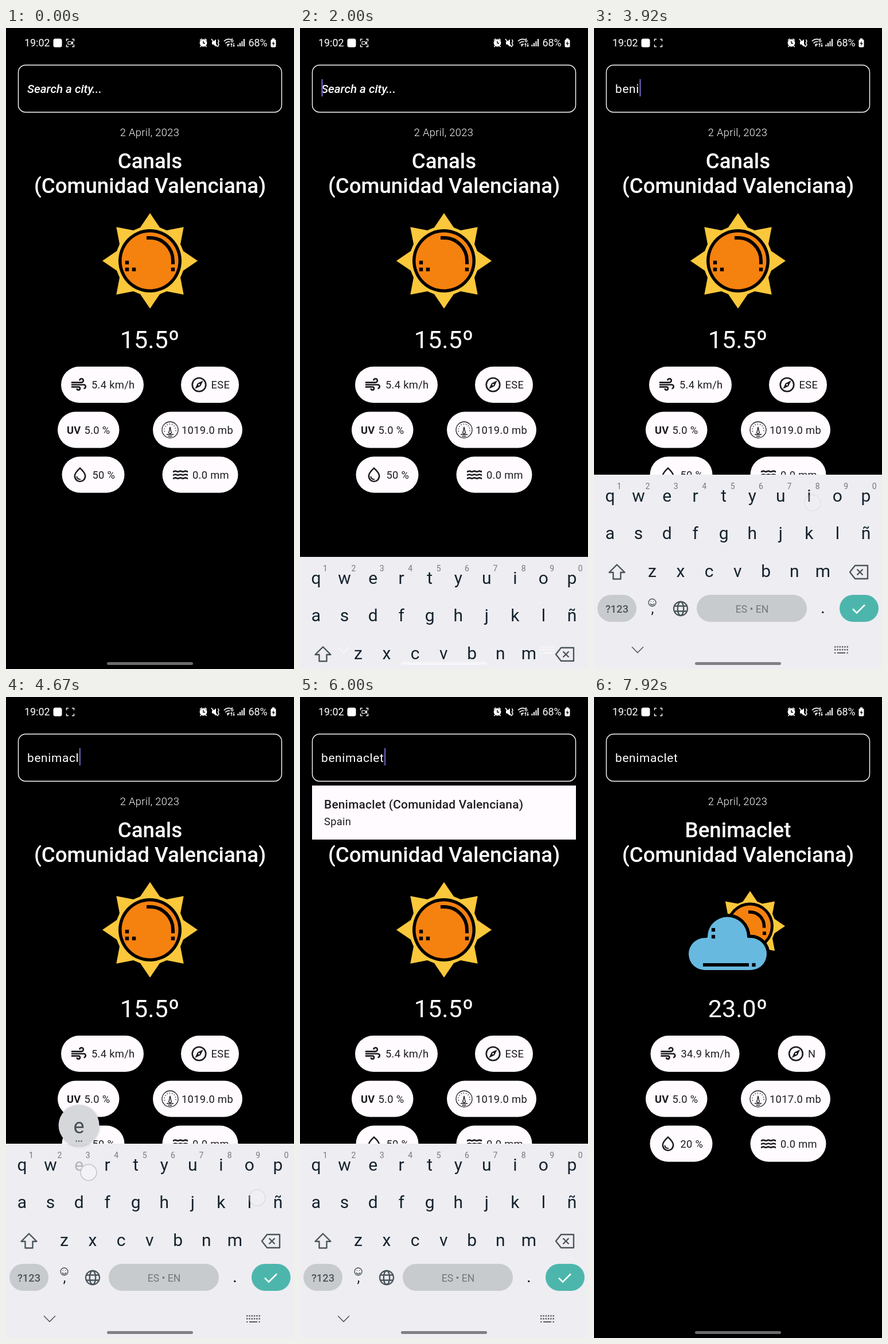
Recreate the animation shown at these times as an HTML page. Size 502x1115 px, loop 8000 ms.

```html
<!DOCTYPE html>
<html lang="en">
<head>
<meta charset="utf-8">
<title>Weather search</title>
<style>
html, body { margin: 0; width: 502px; height: 1115px; overflow: hidden; background: #000; }
svg { display: block; }
text { font-family: Roboto, Arial, sans-serif; font-size: 18.3px; letter-spacing: .33px; white-space: pre; }
.mid { text-anchor: middle; }
.white { fill: #fff; }
.date { font-weight: 300; }
.title { font-size: 36.7px; font-weight: 500; letter-spacing: 0; }
.temp { font-size: 43px; letter-spacing: 0; }
.field { font-size: 20.9px; letter-spacing: .65px; }
.hint { font-size: 20.6px; font-style: italic; font-weight: 500; letter-spacing: 0; }
.option { font-size: 20.9px; font-weight: 500; letter-spacing: .2px; }
.status { font-size: 17.9px; letter-spacing: 0; }
.pill { fill: #fffbff; }
.dark { fill: #1c1b1f; }
.line { fill: none; stroke: #1c1b1f; stroke-width: 2; }
.key { font-size: 30px; letter-spacing: 0; fill: #14232d; }
.comma { font-size: 25px; }
.sup { font-size: 14px; letter-spacing: 0; fill: #74797d; }
.mode { font-weight: 500; letter-spacing: 0; fill: #4a555b; }
.space { font-size: 17.6px; letter-spacing: 0; fill: #71777b; }
.tool { fill: none; stroke: #4a555b; stroke-width: 2.4; stroke-linejoin: round; }
.fine { stroke-width: 1.4; }
.bubble { font-size: 36px; letter-spacing: 0; fill: #465058; }
</style>
</head>
<body>
<svg id="stage" width="502" height="1115" viewBox="0 0 502 1115"></svg>
<script>
const LOOP = 8000, FRAME = 1000 / 12;
const KB = { rise: 1920, up: 2250, fall: 6420, gone: 6600, height: 338 };
const DATA_AT = 6580, ICON_AT = 6750, BAR_AT = 7000;
const LIST_AT = 5330, FOCUS_AT = 1600;

// letter, press time, release time, optional touch point
const presses = [
  ['b', 3120, 3240, 290, 957], ['e', 3370, 3480], ['n', 3560, 3670], ['i', 3750, 3860],
  ['m', 3950, 4060], ['a', 4140, 4250], ['c', 4330, 4440], ['l', 4510, 4630, 438, 871],
  ['e', 4645, 4760, 144, 827], ['t', 4860, 4970]
];
const LAST = presses[presses.length - 1][2];

const text = (x, y, cls, s, attr = '') => `<text x="${x}" y="${y}" class="${cls}" ${attr}>${s}</text>`;
const path = (d, cls, attr = '') => `<path d="${d}" class="${cls}" ${attr}/>`;
const box = (x, y, w, h, r, attr = '') => `<rect x="${x}" y="${y}" width="${w}" height="${h}" rx="${r}" ${attr}/>`;
const dots = (size, ...pts) => pts.map(([x, y]) => box(x - size / 2, y - size / 2, size, size, 0)).join('');

// Icons on a 24-unit grid
const grid = s => `<g transform="scale(1.31) translate(-12 -12)">${s}</g>`;
const wave = 'M2 .5C3.3.5 4-.5 5.3-.5S7.3.5 8.7.5 10.7-.5 12-.5 14 .5 15.3.5 17.3-.5 18.7-.5 20.7.5 22 .5';
const icons = {
  wind: grid(path('M2 9H15.5a2.5 2.5 0 1 0-2.5-2.5M2 12H18.5a2.5 2.5 0 1 1 0 5M2 15H11.5a2 2 0 1 1-2 2', 'line')),
  compass: grid('<circle cx="12" cy="12" r="9" class="line"/>' +
    path('M6.5 17.5l7.5-3.5 3.5-7.5-7.5 3.5z', 'dark') + '<circle cx="12" cy="12" r="1.1" class="pill"/>'),
  gauge: '<circle r="14" class="line" style="stroke-width:1.3"/>' +
    path('M-9.5 3A10 10 0 1 1 9.5 3', 'line', 'stroke-dasharray="1 3.4"') +
    path('M0-5L1.6 3a2.2 2.2 0 1 1-3.2 0zM-6 8H6M-3.5 11H3.5', 'line', 'style="stroke-width:1.3"'),
  drop: grid(path('M12 3.3C7.2 7.6 5 11 5 13.8 5 18 8.2 21 12 21s7-3 7-7.2C19 11 16.8 7.6 12 3.3z', 'line') +
    path('M7.8 14.7c.5 2.6 2.6 3.6 4.5 3.5', 'line', 'style="stroke-width:1.5;stroke-linecap:round"')),
  waves: grid([7.6, 12.1, 16.6].map(y => path(wave, 'line', `transform="translate(0 ${y})"`)).join(''))
};

function pill(x, w, cy, icon, iconDx, label, textDx) {
  const mark = icon === 'UV'
    ? text(x + 16, cy + 6.5, 'dark', 'UV', 'font-weight="700"')
    : `<g transform="translate(${x + iconDx} ${cy})">${icons[icon]}</g>`;
  return box(x, cy - 31.5, w, 63, 31.5, 'class="pill"') + mark + text(x + textDx, cy + 6.5, 'dark', label);
}

function report(city, temp, wind, dir, mb, humid, windBox, dirBox) {
  return text(251, 243.5, 'title mid white', city) +
    text(250.5, 557.3, 'temp mid white', temp) +
    pill(...windBox, 620.5, 'wind', 31, wind, 53) +
    pill(...dirBox, 620.5, 'compass', 31.5, dir, 52.5) +
    pill(90, 107.5, 699, 'UV', 0, '5.0 %', 46.5) +
    pill(256, 156, 699, 'gauge', 30, mb, 50) +
    pill(97.5, 109, 777, 'drop', 31.5, humid, 53) +
    pill(272.5, 132, 777, 'waves', 31.5, '0.0 mm', 52.5);
}

function sunBody(cx, cy, R, ring, core) {
  let pts = '';
  for (let i = 0; i < 8; i++)
    for (const [off, r] of [[-16.3, .728], [0, 1], [16.3, .728]]) {
      const a = (i * 45 + off) * Math.PI / 180;
      pts += `${(cx + R * r * Math.sin(a)).toFixed(1)},${(cy - R * r * Math.cos(a)).toFixed(1)} `;
    }
  return `<polygon points="${pts}" fill="#fbc83c"/><circle cx="${cx}" cy="${cy}" r="${ring}"/>` +
    `<circle cx="${cx}" cy="${cy}" r="${core}" fill="#f5820f"/>`;
}

const cloudPath = 'M193 475a28 28 0 0 1 0-56H195Q198 419 198 417A34.5 34.5 0 0 1 267 417Q267 419 270 419H273a28 28 0 0 1 0 56z';
const sunny = sunBody(251, 405, 83, 55, 49.5) +
  path('M245 365h6a40 40 0 0 1 40 40v6', '', 'fill="none" stroke="#000" stroke-width="6"') +
  dots(6.4, [211, 408], [211, 420], [223, 420], [291, 420]);
const cloudy = sunBody(272, 398.5, 61, 41, 36) +
  path('M269 374h3a24.5 24.5 0 0 1 24.5 24.5v3', '', 'fill="none" stroke="#000" stroke-width="5.5"') +
  dots(6, [297, 411]) +
  path(cloudPath, '', 'stroke="#000" stroke-width="11"') +
  path(cloudPath, '', 'fill="#68b9e0"') +
  dots(6.2, [208, 405], [208, 417], [278.5, 466]) + box(190, 463, 80, 5.8, 0);

const statusBar = text(32, 32, 'status white', '19:02') +
  box(82.5, 18.5, 15, 15, 3.5, 'class="white"') +
  path('M105.5 23v-3.5h3.5M115 19.5h3.5v3.5M118.5 29v3.5h-3.5M109 32.5h-3.5v-3.5', '', 'fill="none" stroke="#fff" stroke-width="1.4"') +
  `<g id="rec" fill="none" stroke="#fff" stroke-width="1.2">${box(108, 23.5, 6, 5, 1)}<path d="M114 26l2.5-2v4z"/></g>` +
  '<g fill="none" stroke="#fff" stroke-width="1.6">' +
  '<circle cx="344" cy="26" r="5.6" fill="#fff"/><path d="M338 21.5l3.5-3M350 21.5l-3.5-3M340 31l-1.6 2M348 31l1.6 2"/>' +
  '<path d="M344 22.5v4h3" stroke="#000" stroke-width="1.3"/>' +
  '<path d="M359 23.5h2.5l4.5-4v13l-4.5-4H359z" fill="#fff" stroke="none"/><path d="M358 19l11 14M369.5 20l1.5 3-1.5 3 1.5 3-1.5 3"/>' +
  '<path d="M380 23a12 12 0 0 1 12-3M382.5 26.5a8 8 0 0 1 8-2.5M385 29.5a5 5 0 0 1 5-1M388 29l-2 3"/>' +
  '<path d="M393 33v-6m-1.5 1.5l1.5-1.5 1.5 1.5M397 26v6m-1.5-1.5l1.5 1.5 1.5-1.5" stroke-width="1.2"/>' +
  '<path d="M404.5 32v-3M408 32v-6M411.5 32v-9M415 32v-13" stroke-width="2"/></g>' +
  text(391.5, 25, 'white', '6', 'style="font-size:9px;font-weight:700"') +
  text(422.5, 32, 'status white', '68%') +
  box(461.5, 20, 9, 13.5, 2, 'class="white"') + box(464, 18, 4, 3, 0, 'class="white"') +
  path('M467 22.5l-3.5 5h2.5l-1 4 3.7-5.2h-2.6z', '');

// Keyboard layout
const keys = {};
const pitch = 49.55;
const addRow = (letters, x, y) => [...letters].forEach((c, i) => keys[c] = [x + i * pitch, y]);
addRow('qwertyuiop', 28, 824);
addRow('asdfghjklñ', 28, 889);
addRow('zxcvbnm', 101.5, 955);

const keyboard = box(0, 777, 502, 345, 0, 'fill="#eeedf2"') +
  Object.entries(keys).map(([c, [x, y]]) => text(x, y, 'key mid', c, `data-key="${c}"`)).join('') +
  [...'1234567890'].map((n, i) => text(44 + i * 49.4, 802, 'sup mid', n)).join('') +
  path('M40 933.5L53.5 947H46.5V958.5H33.5V947H26.5z', 'tool') +
  path('M455 935H477V958H455L446 946.5zM458.5 941.5l10 10M468.5 941.5l-10 10', 'tool') +
  box(6, 986, 68, 47, 23.5, 'fill="#c8cbce"') +
  text(40, 1016.5, 'mode mid', '?123') +
  '<circle cx="101.5" cy="999.5" r="6.5" class="tool fine"/>' +
  path('M98 1001a3.7 3.7 0 0 0 7 0M99.3 997v1M103.7 997v1', 'tool fine') +
  text(102, 1018, 'key comma mid', ',') +
  '<g class="tool"><circle cx="151" cy="1010" r="12"/><ellipse cx="151" cy="1010" rx="5.2" ry="12"/><path d="M140 1005.5h22M140 1014.5h22"/></g>' +
  box(179, 986, 192, 47, 23.5, 'fill="#c8cbce"') +
  text(275.5, 1016.8, 'space mid', 'ES • EN') +
  text(399, 1018, 'key mid', '.') +
  box(428, 986, 68, 47, 23.5, 'fill="#4db6ac"') +
  path('M451 1010.5l7 7 14-14', '', 'fill="none" stroke="#fff" stroke-width="2.5"');

const navIcons = '<g id="nav" fill="none" stroke-width="1.7"><path d="M66 1076.5l10 10 10-10"/>' +
  '<path d="M419 1076.5h24M419 1081.5h24" stroke-width="2.4" stroke-dasharray="2.4 1.9"/>' +
  '<path d="M419 1087h2.4M424 1087h14M440.5 1087h2.4" stroke-width="2.2"/></g>';

const stage = document.getElementById('stage');
stage.innerHTML = box(0, 0, 502, 1115, 0) +
  box(21.5, 64.5, 459, 82, 12.5, 'fill="none" stroke="#fff" stroke-width="1.4"') +
  text(37, 112.5, 'hint white', 'Search a city...', 'id="hint"') +
  text(37, 112.5, 'field white', '', 'id="query"') +
  box(37, 89, 2.6, 30, 0, 'id="caret" fill="#6354a2"') +
  text(250.5, 187.5, 'date mid white', '2 April, 2023') +
  text(251, 287, 'title mid white', '(Comunidad Valenciana)') +
  `<g id="before">${report('Canals', '15.5º', '5.4 km/h', 'ESE', '1019.0 mb', '50 %', [96, 144], [305, 101])}${sunny}</g>` +
  `<g id="after">${report('Benimaclet', '23.0º', '34.9 km/h', 'N', '1017.0 mb', '20 %', [98.5, 155], [320.5, 83])}</g>` +
  `<g id="cloudy">${cloudy}</g>` +
  `<g id="list">${box(21, 154, 460, 94, 0, 'class="pill"')}${text(42, 194, 'option dark', 'Benimaclet (Comunidad Valenciana)')}${text(42, 223, 'dark', 'Spain')}</g>` +
  statusBar + `<g id="board">${keyboard}</g>` + navIcons +
  box(176, 1103, 150, 5, 2.5, 'id="bar"') +
  '<g id="popup" style="filter:drop-shadow(0 1px 2px rgba(0,0,0,.25))"><circle r="35.5" fill="#d5d7da"/>' +
  text(0, 14, 'bubble mid', '') +
  '<path d="M-5.5 27.5h2.2M-1.1 27.5h2.2M3.3 27.5h2.2" stroke="#465058" stroke-width="2.2"/></g>' +
  presses.map(() => '<circle class="touch" r="14" fill="#f4f4f7" fill-opacity=".8" stroke="#c3c5ca" stroke-width="1.5"/>').join('');

const $ = id => document.getElementById(id);
const show = (el, on) => el.style.display = on ? '' : 'none';
const clamp = v => Math.max(0, Math.min(1, v));
const span = (t, a, b) => clamp((t - a) / (b - a));
const mix = (a, b, p) => `rgb(${a.map((v, i) => Math.round(v + (b[i] - v) * p))})`;
const touches = [...document.querySelectorAll('.touch')];
const keyEls = [...document.querySelectorAll('[data-key]')];

presses.forEach(([c, , , x, y], i) => {
  touches[i].setAttribute('cx', x ?? keys[c][0] + 6);
  touches[i].setAttribute('cy', y ?? keys[c][1] + 2);
});

function caretOn(t) {
  if (t < FOCUS_AT || t >= KB.fall) return false;
  if (t >= presses[0][2] && t < LAST) return true;
  return (t - (t < LAST ? FOCUS_AT : LAST)) % 1000 < 500;
}

function drawTyping(t) {
  const typed = presses.filter(p => t >= p[2]).map(p => p[0]).join('');
  const query = $('query');
  if (query.textContent !== typed) query.textContent = typed;
  show($('hint'), !typed);
  show($('caret'), caretOn(t));
  $('caret').setAttribute('x', 37.2 + (typed ? query.getComputedTextLength() : 0));

  const down = presses.find(p => t >= p[1] && t < p[2]);
  const popup = $('popup');
  show(popup, down);
  keyEls.forEach(el => el.style.opacity = down && el.dataset.key === down[0] ? .28 : 1);
  if (down) {
    const [x, y] = keys[down[0]];
    popup.setAttribute('transform', `translate(${x} ${y - 79})`);
    popup.querySelector('text').textContent = down[0];
    show(popup.querySelector('path'), 'eianc'.includes(down[0]));
  }
  presses.forEach((p, i) => {
    show(touches[i], t >= p[1] && t < p[2] + 90);
    touches[i].style.opacity = t < p[2] ? 1 : .7 * (1 - span(t, p[2], p[2] + 90));
  });
}

function drawKeyboard(t) {
  const left = t < KB.fall ? Math.pow(1 - span(t, KB.rise, KB.up), 3.1) : Math.pow(span(t, KB.fall, KB.gone), 2);
  $('board').setAttribute('transform', `translate(0 ${Math.round(left * KB.height)})`);
  show($('board'), left < 1);
  show($('nav'), t >= KB.rise && t < KB.fall);
  $('nav').setAttribute('stroke', mix([250, 250, 252], [88, 92, 96], span(t, KB.up, 2350)));
  const bar = $('bar');
  show(bar, t < KB.fall || t >= BAR_AT);
  bar.setAttribute('fill', t < KB.rise || t >= BAR_AT ? '#6c6c6c' : mix([246, 246, 249], [128, 128, 131], span(t, 2080, 2160)));
  bar.style.opacity = t >= BAR_AT ? span(t, BAR_AT - 60, BAR_AT + 160) : 1;
}

function draw(t) {
  show($('rec'), t % 1000 < 500);
  show($('before'), t < DATA_AT);
  show($('after'), t >= DATA_AT);
  show($('cloudy'), t >= ICON_AT);
  show($('list'), t >= LIST_AT && t < KB.fall);
  drawTyping(t);
  drawKeyboard(t);
}

const start = performance.now();
function tick() {
  const t = (performance.now() - start) % LOOP;
  draw(Math.floor((t + 4) / FRAME) * FRAME % LOOP);
  requestAnimationFrame(tick);
}
tick();
</script>
</body>
</html>
```
